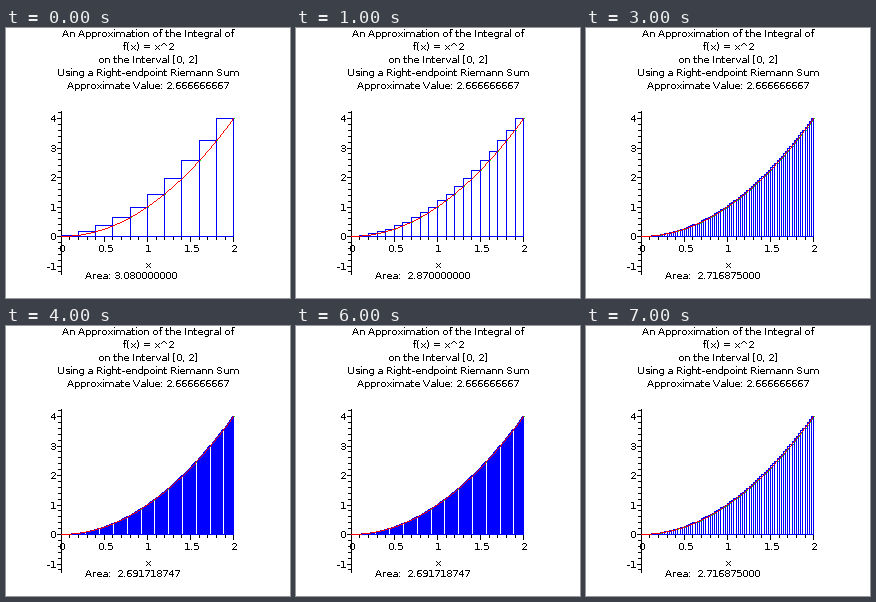
Animation of 284 by 270 pixels, one loop 8000 ms. Source, as a matplotlib script:

```python
import numpy as np
import matplotlib.pyplot as plt
from matplotlib.animation import FuncAnimation

W, H, DPI = 284, 270, 64
PX = 72 / DPI                 # one pixel in points
LEFT, RIGHT, BASE = 55, 227, 208  # pixel columns and row of the axes
X0, SX, SY = 55.21, 86.25, 29.5   # origin and pixels per unit

plt.rcParams.update({
    "font.family": "DejaVu Sans",
    "font.size": 10 * PX,
    "text.antialiased": False,
    "text.hinting": "default",
    "text.hinting_factor": 1,
    "path.simplify": False,
})

TITLE = [
    "An Approximation of the Integral of",
    "f(x) = x^2",
    "on the Interval [0, 2]",
    "Using a Right-endpoint Riemann Sum",
    "Approximate Value: 2.666666667",
]

# number of rectangles and the caption for it
LEVELS = [
    (10, "Area: 3.080000000"),
    (20, "Area:  2.870000000"),
    (40, "Area:  2.767500000"),
    (80, "Area:  2.716875000"),
    (160, "Area:  2.691718747"),
    (320, "Area:  2.679179688"),
]
ORDER = [0, 1, 2, 3, 4, 5, 4, 3]


def col(x):
    return np.floor(X0 + SX * np.asarray(x))


def row(y):
    return np.floor(BASE + 0.5 - SY * np.asarray(y))


def runs(xs, ys, length=1):
    """Horizontal runs of whole pixels as one broken line."""
    xs, ys = np.asarray(xs, float), np.asarray(ys, float) + 0.5
    gap = np.full_like(xs, np.nan)
    return (np.column_stack([xs, xs + length, gap]).ravel(),
            np.column_stack([ys, ys, gap]).ravel())


def bars(n):
    """Outline of n rectangles with right-endpoint heights."""
    x = np.linspace(0, 2, n + 1)
    edge = col(x) + 0.5
    top = row(x[1:] ** 2) + 0.5
    base = np.full(n, BASE + 0.5)
    left, right = edge[:-1], edge[1:]
    xs = np.column_stack([left, left, right, right, left])
    ys = np.column_stack([base, top, top, base, base])
    return xs.ravel(), ys.ravel()


def dots(n):
    """Small dots at the right endpoints."""
    x = np.linspace(0, 2, n + 1)[1:]
    return runs(col(x), row(x ** 2), 2)


def curve():
    """Pixels nearest to the parabola, by column and by row."""
    xs = np.arange(LEFT, RIGHT + 1)
    ys = np.arange(row(4), BASE + 1)
    x = np.clip((xs + 0.5 - X0) / SX, 0, 2)
    height = np.clip((BASE - ys) / SY, 0, 4)
    return runs(np.r_[xs, col(np.sqrt(height))], np.r_[row(x ** 2), ys])


fig = plt.figure(figsize=(W / DPI, H / DPI), dpi=DPI, facecolor="white")
ax = fig.add_axes([0, 0, 1, 1])
ax.set_xlim(0, W)
ax.set_ylim(H, 0)
ax.axis("off")


def line(xs, ys, color, cap="butt"):
    return ax.plot(xs, ys, color=color, lw=PX, antialiased=False, snap=False,
                   solid_capstyle=cap, solid_joinstyle="miter")[0]


def label(x, y, text, ha="center"):
    return ax.text(x, y, text, ha=ha, va="baseline", color="black")


def draw_axes():
    line([LEFT + 0.5] * 2, [83, 247], "black")
    line([LEFT, RIGHT + 1], [BASE + 0.5] * 2, "black")
    for i in range(21):
        x = col(i / 10) + 0.5
        line([x, x], [BASE + 1, BASE + (6 if i % 5 == 0 else 4)], "black")
    for i in range(-6, 22):
        y = row(i / 5) + 0.5
        line([LEFT - (4 if i % 5 == 0 else 3), LEFT], [y, y], "black")
    for v in range(-1, 5):
        label(50, row(v) + 4, str(v), "right")
    for i, text in enumerate(["0", "0.5", "1", "1.5", "2"]):
        label(LEFT + 1 + i * SX / 2, 224, text)
    label(142, 240, "x")


for i, text in enumerate(TITLE):
    label(142, 9 + 13 * i, text)
draw_axes()
points = line([], [], "#00ff00")
outline = line([], [], "#0000ff", "projecting")
line(*curve(), "#ff0000")
caption = label(79, 251, "", "left")


def update(k):
    n, text = LEVELS[ORDER[k]]
    outline.set_data(*bars(n))
    points.set_data(*dots(n))
    caption.set_text(text)
    return outline, points, caption


anim = FuncAnimation(fig, update, frames=len(ORDER), interval=1000,
                     repeat=True, repeat_delay=0, blit=False)
plt.show()
```
